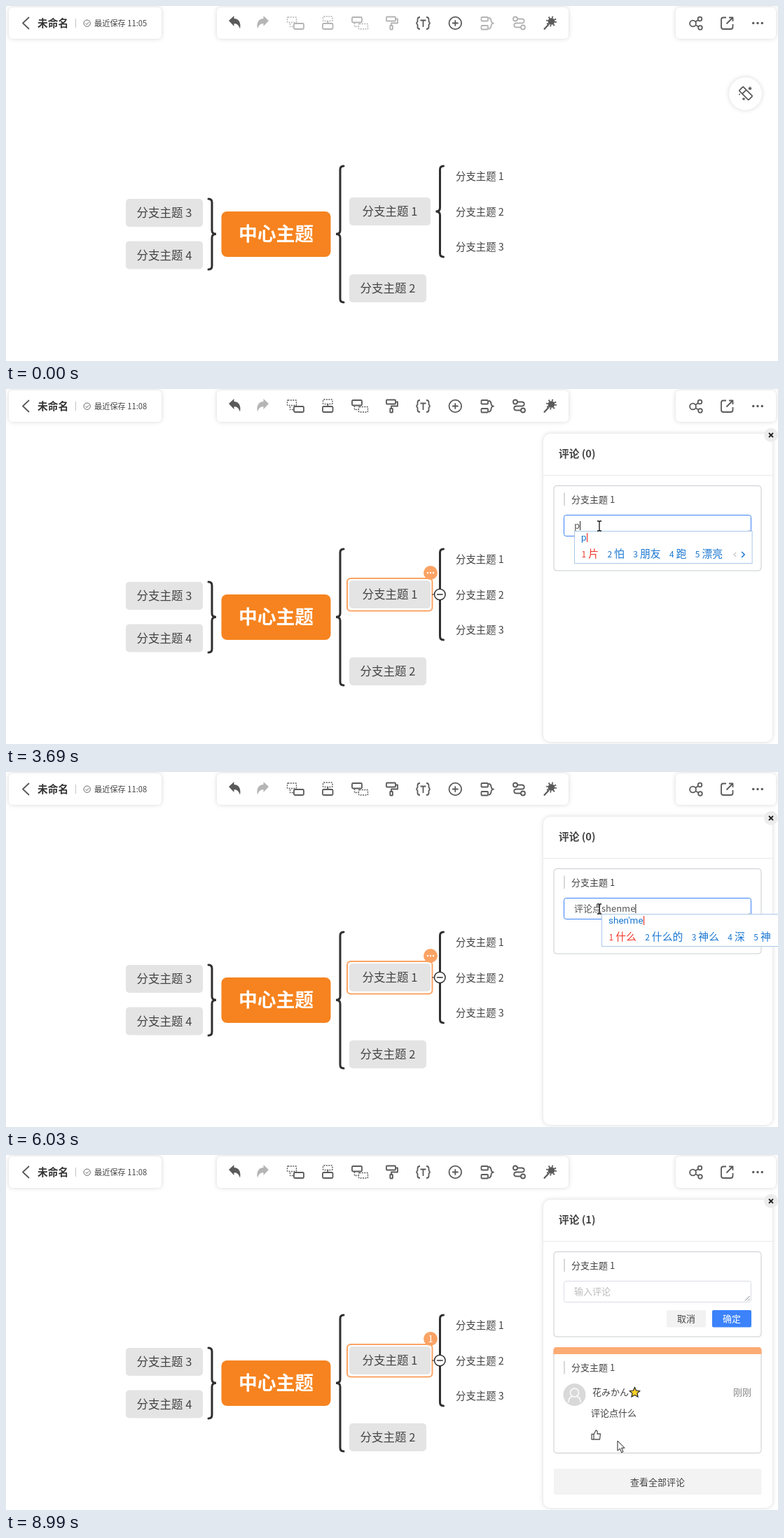
An HTML page for the animation above (9.06 s loop, 1102 by 508 pixels).

```html
<!DOCTYPE html>
<html lang="zh-CN">
<head>
<meta charset="utf-8">
<style>
  html, body { margin: 0; width: 100%; height: 100%; overflow: hidden; background: #fff; }
  svg { display: block; width: 100vw; height: 100vh; }
  text { font-family: "Noto Sans CJK SC", "Noto Sans CJK", "Noto Sans", sans-serif; white-space: pre; }
  .card { fill: #fff; filter: drop-shadow(0 0 3px rgba(0, 0, 0, .16)); }
  .icon { fill: none; stroke: #5a5a5a; stroke-width: 1.8; stroke-linejoin: round; }
  .icon .solid { fill: #5a5a5a; stroke: none; }
  .icon .dash { stroke-width: 1.4; stroke-dasharray: 2 1.4; }
  .off { opacity: .45; }
  .brace { fill: none; stroke: #2f2f2f; stroke-width: 3; stroke-linecap: round; }
  .line { fill: none; stroke: #c9ccd0; }
</style>
</head>
<body>
<svg id="stage" viewBox="0 0 1102 508"></svg>
<script>
const LOOP = 9060;
const $ = id => document.getElementById(id);

// Text placed by the vertical centre of its glyphs.
const label = (x, cy, size, str, attrs = '') =>
  `<text x="${x}" y="${cy + size * .37}" font-size="${size}" fill="#444" ${attrs}>${str}</text>`;
const middle = 'text-anchor="middle"';
const box = (x, y, w, h, rx, attrs) =>
  `<rect x="${x}" y="${y}" width="${w}" height="${h}" rx="${rx}" ${attrs}/>`;
const path = (d, attrs = '') => `<path d="${d}" ${attrs}/>`;
const circle = (x, y, r, attrs = '') => `<circle cx="${x}" cy="${y}" r="${r}" ${attrs}/>`;
const dots = (x, y, gap, r, attrs) => [-gap, 0, gap].map(d => circle(x + d, y, r, attrs)).join('');

const node = (x, y, w, str) =>
  box(x, y, w, 40, 5, 'fill="#e4e4e4"') + label(x + w / 2, y + 20, 16.5, str, middle);

// Curly brace: dir 1 has its tip on the right, -1 on the left.
const brace = (x, top, tip, bottom, dir) => path(
  `M${x - 5 * dir} ${top}Q${x} ${top} ${x} ${top + 5}V${tip - 5}Q${x} ${tip} ${x + 6 * dir} ${tip}` +
  `Q${x} ${tip} ${x} ${tip + 5}V${bottom - 5}Q${x} ${bottom} ${x - 5 * dir} ${bottom}`, 'class="brace"');

const star = (cx, cy, r, attrs) => {
  const points = Array.from({ length: 10 }, (_, i) => {
    const a = i * Math.PI / 5 - Math.PI / 2, d = i % 2 ? r * .48 : r;
    return (cx + d * Math.cos(a)).toFixed(1) + ',' + (cy + d * Math.sin(a)).toFixed(1);
  });
  return `<polygon points="${points.join(' ')}" ${attrs}/>`;
};

const header =
  box(4, 2, 218, 45, 6, 'class="card" id="savePill"') +
  path('M33 16L24 24.5L33 33', 'class="icon"') +
  label(45, 24.5, 14.7, '未命名', 'font-weight="700" style="fill:#333"') +
  path('M99.5 18V31', 'stroke="#c4c4c4"') +
  circle(115.7, 24.7, 4.7, 'fill="none" stroke="#666"') +
  path('M113.4 24.8l1.8 1.8 3-3.4', 'fill="none" stroke="#666"') +
  label(126, 24.5, 11.2, '', 'id="saveText"');

const arrow = 'M318 21L325.5 14V18C332 18 336 24 334 32.5C332 27 329.5 25.2 325.5 25.2V29Z';
const needsNode =
  box(401.5, 16, 13, 7.5, 1, 'class="dash"') + box(411, 25, 14, 8, 1.5, '') +
    path('M405.5 25V29.5H410', 'class="dash"') +
  box(452.5, 15, 13.5, 6.5, 1, 'class="dash"') + box(452, 25, 14.5, 8, 1.5, '') + path('M459.3 21V25') +
  box(494, 16, 14, 7.5, 1.5, '') + box(503.5, 25.5, 13, 7.5, 1, 'class="dash"') +
    path('M497.5 24V29.5H503', 'class="dash"') +
  box(543, 15.5, 13, 6, 1, '') + path('M556 18.5H559V24.5H550V28') + box(548.3, 28, 3.6, 5.5, .5, '') +
  box(678.5, 16, 9.5, 5.5, 1, '') + box(678.5, 28, 9.5, 5.5, 1, '') +
    path('M689 17C695 17 690 24.7 696 24.7C690 24.7 695 32.5 689 32.5') +
  circle(727, 18.5, 3) + circle(738, 30.5, 3) +
    path('M730 18.5H736C741 18.5 741 24.5 736 24.5H729C724 24.5 724 30.5 729 30.5H735');

const toolbar =
  box(301, 2, 502, 45, 6, 'class="card"') +
  '<g class="icon">' + path(arrow, 'class="solid"') +
  `<g class="off" transform="matrix(-1 0 0 1 693 0)">${path(arrow, 'class="solid"')}</g>` +
  `<g id="needsNode">${needsNode}</g>` +
  path('M591 16Q587.5 16 587.5 19.5V22L586 24.5L587.5 27V30Q587.5 33 591 33M600 16Q603.5 16 603.5 19.5V22L605 24.5L603.5 27V30Q603.5 33 600 33M591.5 20.5H599.5M595.5 20.5V30') +
  circle(641.3, 24.5, 8.8) + path('M637 24.5H645.6M641.3 20.2V28.8') +
  circle(778.5, 22, 4.8, 'class="solid"') +
  circle(778.5, 22, 6, 'stroke-width="3" stroke-dasharray="1.7 3.01"') +
  path('M775 26L768 33.5', 'stroke-width="2.2"') + '</g>';

const actions =
  box(956, 2, 143, 45, 6, 'class="card"') + '<g class="icon">' +
  circle(980.5, 25, 4.4) + circle(990.5, 18.5, 2.8) + circle(991, 31, 2.8) +
  path('M984.5 22.5L988 20M984.5 27.5L988.5 29.5') +
  path('M1028 16.5H1024Q1021 16.5 1021 19.5V30Q1021 33 1024 33H1034.5Q1037.5 33 1037.5 30V26M1032 16.5H1037.5V22M1037.5 16.5L1028.5 25.5') +
  dots(1073, 24.5, 6.3, 1.7, 'class="solid"') + '</g>' +
  circle(1055.5, 125.5, 23.5, 'class="card"') +
  '<g class="icon"><g transform="rotate(45 1056 125)">' +
  box(1046.5, 121, 19, 8, 1, '') + path('M1053 121V129') + '</g>' +
  star(1062, 118, 3.2, 'class="solid"') + star(1053, 133, 2.6, 'class="solid"') +
  circle(1047, 126.5, 1, 'class="solid"') + '</g>';

const map =
  node(171, 276, 110, '分支主题 3') + node(171, 336.5, 110, '分支主题 4') +
  node(490, 274, 116, '分支主题 1') + node(490, 384, 110, '分支主题 2') +
  box(307.5, 294, 156, 65, 8, 'fill="#f6831f"') +
  label(385.5, 326.5, 26.8, '中心主题', middle + ' font-weight="700" style="fill:#fff"') +
  brace(294, 276, 326.3, 377, 1) + brace(477, 229, 326.3, 424, -1) + brace(619.5, 229, 294, 359, -1) +
  [244, 295, 344.5].map((y, i) => label(642, y, 14.4, '分支主题 ' + (i + 1))).join('');

const orange = '#fba364';
const selection =
  '<g id="selection">' + box(487, 271, 121.5, 46.5, 5, `fill="none" stroke="${orange}" stroke-width="2"`) +
  box(610, 290, 8, 8, 0, 'fill="#fff"') + path('M608 294H612', 'stroke="#2f2f2f"') +
  circle(619.3, 294, 7.8, 'fill="#fff" stroke="#2f2f2f" stroke-width="1.5"') +
  path('M615 294H623.6', 'stroke="#2f2f2f" stroke-width="1.5"') +
  circle(606, 263, 9.2, `id="badge" stroke="${orange}" stroke-width="1.5"`) +
  `<g id="badgeDots">${dots(606, 263, 4, 1.2)}</g>` +
  label(606, 263, 13, '1', middle + ' id="badgeCount" style="fill:#fff"') + '</g>';

const quote = cy => path(`M797 ${cy - 9.5}V${cy + 9}`, 'stroke="#ccc" stroke-width="1.5"') + label(807, cy, 13, '分支主题 1');

const comment =
  '<g id="comment">' + box(782, 275.5, 296, 151, 4, 'class="line"') +
  path('M781.5 285V279.5Q781.5 275 786 275H1074Q1078.5 275 1078.5 279.5V285Z', 'fill="#fcab74"') + quote(304.5) +
  circle(811.5, 343, 16, 'fill="#d9d9d9"') +
  '<g fill="none" stroke="#fff" stroke-width="1.4">' + circle(811.5, 340, 6) +
  path('M802.5 354Q803 347 808 345.5M815 345.5Q820 347 820.5 354') + '</g>' +
  label(837, 339, 13, '花みかん') + star(897.5, 340, 7.6, 'fill="#fbd128" stroke="#222" stroke-width="1.2"') +
  label(1038, 339, 13, '刚刚', 'style="fill:#888"') + label(835, 369, 13, '评论点什么') +
  path('M836 399.5H839V407H836ZM839 400L842 394Q845 394 844 399H848.5L847.5 407H839', 'fill="none" stroke="#555" stroke-width="1.3" stroke-linejoin="round"') +
  box(782, 449, 296.5, 37, 2, 'fill="#f3f3f3"') + label(930, 468, 13, '查看全部评论', middle) + '</g>';

const ime =
  '<g id="ime">' + box(0, 203.5, 250, 46, 0, 'id="imeBox" fill="#fff" stroke="#a9c8e8"') +
  '<text id="pinyin" y="217" font-size="13.5" fill="#1976d2" style="font-family:Roboto,sans-serif"></text>' +
  path('M0 206V219', 'id="imeCaret" stroke="#f0392b" stroke-width="1.2"') +
  '<text id="candidates" y="241.3" font-size="14.8"></text>' +
  `<g id="imeArrows" fill="none" stroke-width="1.5">${path('M4 234l-3 3 3 3', 'stroke="#ccc"')}${path('M12 233l4 4-4 4', 'stroke="#1976d2"')}</g></g>`;

const panel =
  '<g id="panel">' + box(767, 64, 327, 441, 10, 'class="card"') +
  label(789, 93, 14.7, '', 'id="title" font-weight="700"') + path('M767 123.5H1094', 'stroke="#e8eaec"') +
  circle(1092, 66, 10, 'fill="#ececec"') + path('M1089 63l6 6m0-6l-6 6', 'stroke="#222" stroke-width="1.8"') +
  box(782, 138.5, 296, 121.5, 4, 'class="line"') + quote(158) +
  box(796.5, 180.5, 267, 30, 3, 'id="input" fill="#fff"') +
  path('M1055 208.5l6.5-6.5M1059 208.5l2.5-2.5', 'stroke="#777"') +
  label(811, 195, 13, '', 'id="inputText"') + path('M0 189V202', 'id="caret" stroke="#222"') +
  box(943, 222, 56, 24.5, 2, 'fill="#f2f2f2"') + label(971, 234.3, 13, '取消', middle) +
  box(1008, 222, 56, 24.5, 2, 'fill="#3b82fb"') +
  label(1036, 234.3, 13, '确定', middle + ' font-weight="500" style="fill:#fff"') +
  comment + ime + '</g>';

const toast =
  '<g id="toast">' + box(401.5, 68.5, 301, 38, 3, 'fill="#f0f9eb" stroke="#e1f3d8"') +
  circle(426.5, 87.5, 6, 'fill="#67c23a"') + path('M423.6 87.5l2.2 2.2 3.8-4', 'fill="none" stroke="#fff" stroke-width="1.3"') +
  label(440, 87.5, 11.5, '评论成功', 'style="fill:#67c23a"') + '</g>';

const pointers = {
  arrow: path('M0 0V14.2L3.4 11.1L5.7 16.7L8 15.7L5.7 10.2H10Z', 'fill="#fff" stroke="#222"'),
  hand: path('M-1.8 1.2Q0 -1 1.8 1.2V8Q4 7 5 9Q7 8.3 7.6 10Q10 9.6 10 12V15Q10 18 7.8 20.5H-.5Q-2.5 17 -5.5 13.5Q-5.5 10.6 -1.8 13Z', 'fill="#fff" stroke="#222" stroke-width="1.2"'),
  beam: path('M-3 -7H-1L0 -6L1 -7H3M0 -6V6M-3 7H-1L0 6L1 7H3', 'fill="none" stroke="#111" stroke-width="1.3"'),
};
const cursor = '<g id="cursor">' + circle(0, -1, 10.5, 'id="click" fill="#b4d63c" opacity=".75"') +
  Object.entries(pointers).map(([name, shape]) => `<g id="${name}">${shape}</g>`).join('') + '</g>';

$('stage').innerHTML = header + toolbar + actions + map + selection + panel + toast + cursor;

// time, x, y of the pointer
const route = [
  [70, 1056, 492], [970, 580, 291], [1500, 580, 291], [1710, 605, 263], [2260, 605, 263],
  [2540, 745, 254], [2820, 847, 196], [6640, 847, 196], [7110, 1027, 241], [7740, 1027, 241],
  [8470, 728, 452], [8800, 728, 452], [8990, 873, 409],
];
const clicks = [[1040, 1180], [2000, 2140], [2890, 3100], [7180, 7390]];

// time, committed text, pinyin being composed, candidates
const typing = [
  [0, '', '', ''],
  [3690, '', 'p', '片 怕 朋友 跑 漂亮'],
  [3890, '', 'pi', '批 皮 皮肤 匹 脾气'],
  [4090, '', 'pin', '品 拼 品质 频 频率'],
  [4290, '', 'ping', '平 评 平时 瓶 评价'],
  [4490, '', "ping'l", '评论 平了 评率 平凉 平路'],
  [4620, '', "ping'lu", '评论 平路 屏路 平陆 平炉'],
  [4690, '', "ping'lun", '评论 平论 评 平 凭'],
  [4820, '评论', '', ''],
  [4890, '评论', 'd', '的 都 到 点 大'],
  [4960, '评论', 'di', '第 地 低 底 地方'],
  [5090, '评论', 'dia', '点 掉 电 店 电话'],
  [5160, '评论', 'dian', '点 电 店 典 垫'],
  [5300, '评论点', '', ''],
  [5560, '评论点', 's', '是 上 说 什么 时'],
  [5690, '评论点', 'sh', '是 上 说 什么 时'],
  [5760, '评论点', 'she', '社 设 射 设计 蛇'],
  [5830, '评论点', 'shen', '什 深 神 身 什么'],
  [5900, '评论点', "shen'm", '什么 神秘 生命 声明 神马'],
  [5970, '评论点', "shen'me", '什么 什么的 神么 深 神'],
  [6110, '评论点什么', '', ''],
  [7460, '', '', ''],
];

const ramp = (t, from, to) => Math.min(1, Math.max(0, (t - from) / (to - from)));
const show = (id, visible) => $(id).setAttribute('visibility', visible ? 'inherit' : 'hidden');
const set = (id, attrs) => Object.entries(attrs).forEach(([k, v]) => $(id).setAttribute(k, v));

function pointerAt(t) {
  const i = Math.max(0, route.findLastIndex(key => key[0] <= t));
  const a = route[i], b = route[i + 1] || a;
  const k = ramp(t, a[0], b[0] + (a === b));
  return [a[1] + (b[1] - a[1]) * k, a[2] + (b[2] - a[2]) * k];
}

function drawIme(x, pinyin, words) {
  show('ime', pinyin);
  if (!pinyin) return;
  set('pinyin', { x: x + 9.5 });
  $('pinyin').textContent = pinyin;
  const caretX = x + 10.5 + $('pinyin').getComputedTextLength();
  set('imeCaret', { transform: `translate(${caretX})` });
  set('candidates', { x: x + 10 });
  $('candidates').innerHTML = words.split(' ').map((word, i) => {
    const fill = i ? '#1976d2' : '#f0392b';
    return `<tspan font-size="12" fill="${fill}" dx="${i ? 12.4 : 0}">${i + 1}</tspan><tspan fill="${fill}" dx="3">${word}</tspan>`;
  }).join('');
  const bounds = $('candidates').getBBox(), end = bounds.x + bounds.width;
  set('imeArrows', { transform: `translate(${end + 15})` });
  set('imeBox', { x, width: end + 42 - x });
}

function drawCursor(t, open) {
  const [x, y] = pointerAt(t);
  const over = (x0, y0, x1, y1) => x >= x0 && x <= x1 && y >= y0 && y <= y1;
  const onButton = Math.hypot(x - 606, y - 263) < 11 ||
    open && (over(943, 222, 999, 247) || over(1008, 222, 1064, 247)) ||
    t > 7530 && over(782, 449, 1078, 486);
  const kind = onButton ? 'hand' : open && over(796, 180, 1064, 211) ? 'beam' : 'arrow';
  for (const name in pointers) show(name, name === kind);
  show('click', clicks.some(([from, to]) => t >= from && t < to));
  show('cursor', t >= 70);
  set('cursor', { transform: `translate(${x} ${y})` });
}

function draw(t) {
  const selected = t >= 1110, open = t >= 2140, posted = t >= 7490;
  const focused = t >= 2890 && t < 7460;

  const justSaved = t >= 500 && t < 3030;
  set('savePill', { width: justSaved ? 188 : 218 });
  $('saveText').textContent = justSaved ? '保存成功' : t < 500 ? '最近保存 11:05' : '最近保存 11:08';
  set('needsNode', { class: selected ? '' : 'off' });

  show('selection', selected);
  set('badge', { fill: open ? orange : '#fff' });
  set('badgeDots', { fill: open ? '#fff' : orange });
  show('badgeDots', selected && !posted);
  show('badgeCount', posted);

  show('panel', open);
  set('panel', { transform: `translate(${340 * (1 - ramp(t, 2140, 2340)) ** 2})` });
  $('title').textContent = `评论 (${posted ? 1 : 0})`;
  set('comment', { opacity: ramp(t, 7480, 7680) });

  const [, done, pinyin, words] = typing.findLast(step => step[0] <= t);
  const typed = done + pinyin.replace("'", '');
  set('input', { stroke: focused ? '#3b82f6' : '#d9dce3' });
  $('inputText').textContent = typed || (focused && t >= 3690 ? '' : '输入评论');
  $('inputText').style.fill = typed ? '#555' : '#bbb';
  const caretX = typed ? 811.5 + $('inputText').getComputedTextLength() : 811;
  set('caret', { transform: `translate(${caretX})` });
  show('caret', open && focused && (pinyin || t < 6640 && t % 1060 < 530));
  drawIme(811.5 + 13 * done.length, pinyin, words);

  const toastIn = ramp(t, 7440, 7650) - ramp(t, 8520, 8740);
  set('toast', { opacity: toastIn, transform: `translate(0 ${-20 * (1 - toastIn)})` });
  drawCursor(t, open);
}

const start = performance.now();
function tick() {
  draw((performance.now() - start) % LOOP);
  requestAnimationFrame(tick);
}
tick();
</script>
</body>
</html>
```
